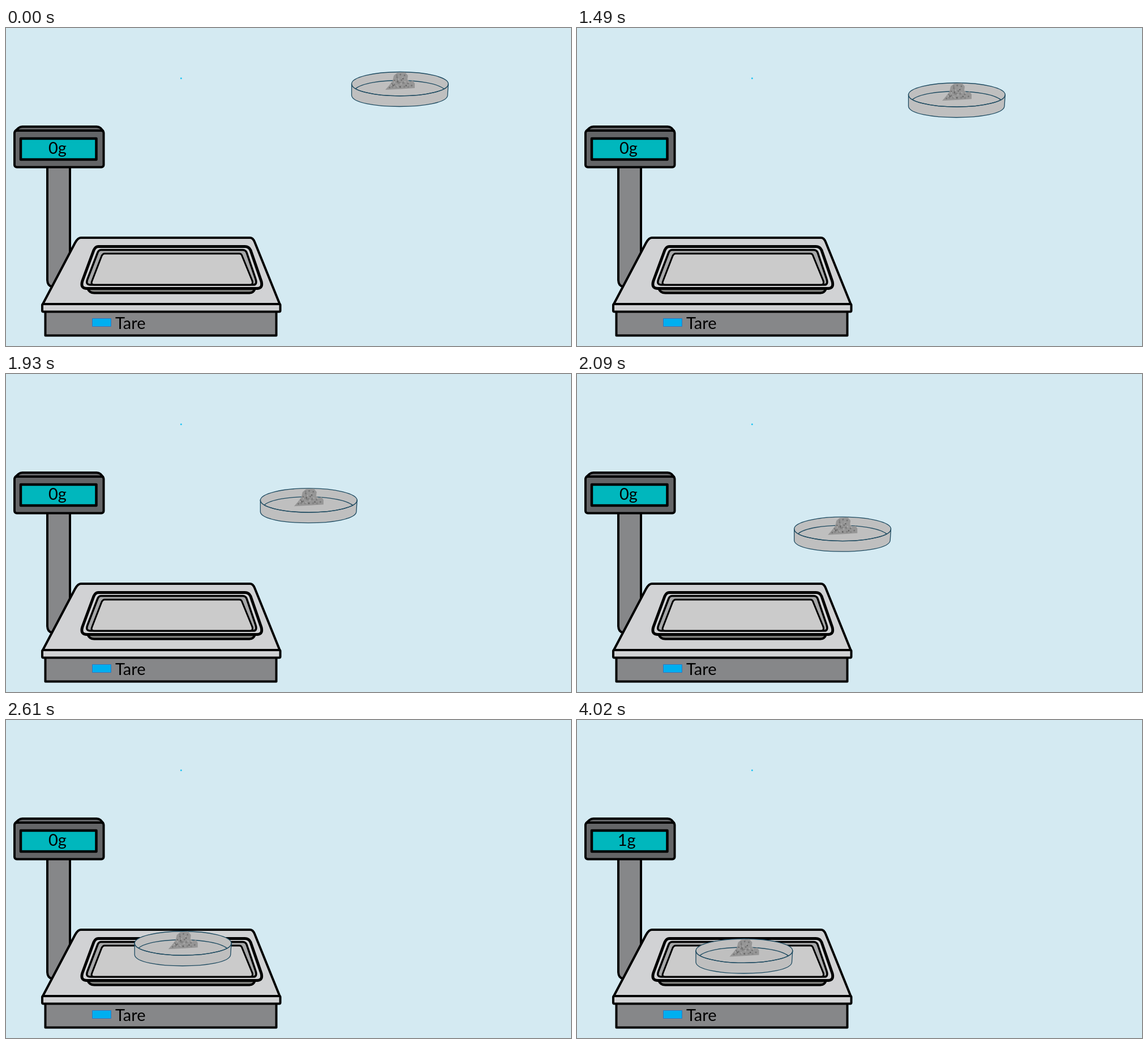
These frames come from a looping animation (998x561 px, 5.03 s). An HTML page without scripts:

```html
<!DOCTYPE html>
<html lang="en">
<head>
<meta charset="utf-8">
<title>Weighing a sample</title>
<style>
  @property --u { syntax: "<number>"; inherits: false; initial-value: 0; }

  html, body { margin: 0; width: 100%; height: 100%; overflow: hidden; background: #d4eaf2; }
  svg { display: block; width: 100%; height: 100%; }
  text { font: 29px Lato, "Open Sans", sans-serif; fill: #000; }

  .scale { stroke: #000; stroke-width: 4; stroke-linejoin: round; }
  .scale text { stroke: none; }
  .steel { fill: #868789; }
  .plate { fill: #d1d2d4; }
  .head { fill: #646567; }

  /* --u runs in 40 ms steps; --p is its smootherstep */
  .dish {
    --c: min(1, var(--u));
    --p: calc(var(--c) * var(--c) * var(--c) * (10 - 15 * var(--c) + 6 * var(--c) * var(--c)));
    transform: translate(calc(var(--p) * -400.5px), calc(var(--p) * 308.5px));
    animation: slide 5.03s infinite;
  }
  @keyframes slide {
    0% { --u: 0; animation-timing-function: step-end; }
    22.46% { --u: .008; animation-timing-function: steps(46, end); }
    59.04%, 100% { --u: 1.019; }
  }

  .glass { fill: #bfbfbf; stroke: #1d4a60; stroke-width: 1.3; }
  .line { fill: none; }

  .before, .after { animation: hide 5.03s step-end infinite; }
  .after { animation-name: show; }
  @keyframes hide { 0% { visibility: visible; } 79.91%, 100% { visibility: hidden; } }
  @keyframes show { 0% { visibility: hidden; } 79.91%, 100% { visibility: visible; } }
</style>
</head>
<body>
<svg viewBox="0 0 998 561" preserveAspectRatio="none">
  <rect width="998" height="561" fill="#d4eaf2"/>
  <circle cx="309.3" cy="88.7" r="1.5" fill="#1fc3f3"/>

  <g class="scale">
    <!-- column -->
    <path class="steel" d="M73 245V445Q73.500 455 81 456H113V245Z"/>

    <!-- display -->
    <path class="head" d="M16.500 181.500L22 176.500Q25 174 29 174H160Q164 174 167 176.500L171.500 181.500Z"/>
    <rect class="head" x="15" y="181" width="157.500" height="64.500" rx="4"/>
    <rect x="26" y="195" width="133.500" height="37" fill="#00b7bd" stroke-width="4.500"/>
    <text class="before" x="75" y="222">0g</text>
    <text class="after" x="71.800" y="222">1g</text>

    <!-- base and platform -->
    <rect class="steel" x="69.500" y="500" width="408" height="42.500"/>
    <path class="plate" d="M65 487L122 379Q127 370 132 370H431Q436 370 439 377L483.500 487Z"/>
    <rect class="plate" x="64" y="487" width="420.500" height="13.500" rx="2"/>

    <!-- tray -->
    <path d="M144 459Q147 467.500 156 467.500H430Q438 467 440 459Z" fill="#7c7d7a"/>
    <path class="plate" stroke-width="5" d="M163 385.500H422Q429 385.500 432 392L451 447Q454 459 444 459.500H142Q131 459 135 446L155 392Q158 385.500 163 385.500Z"/>
    <path fill="#a6a7a8" stroke-width="3.500" d="M168 391.500H418Q423 391.500 425 396L441 443Q444 453 437 453H149Q140 453 144 443L162 396Q164 391.500 168 391.500Z"/>
    <path fill="#cbcbcb" stroke-width="3" d="M174 398H412Q416 398 417 402L435 446Q437 453 431 453H156Q149 453 152 446L169 402Q171 398 174 398Z"/>

    <!-- button -->
    <rect x="152.500" y="512.500" width="33" height="14" fill="#00aff0" stroke="#3474bd" stroke-width="1"/>
    <text x="193" y="531">Tare</text>
  </g>

  <g class="dish">
    <g class="glass">
      <path d="M610.500 98.500V119C613 145 777 145 780 119L781.300 98.500Z"/>
      <ellipse cx="695.900" cy="98.700" rx="85.400" ry="21.200"/>
      <path class="line" d="M617.500 107C640 87.500 750 87.500 774.500 108"/>
    </g>
    <path fill="#969696" d="M670 109L677 101L683 93L685 84L691 79L705 78L710 84L709 91L713 94L719 93L722 98V106L699 107.500Z"/>
    <g fill="none" stroke-width="2.600">
      <path stroke="#747474" stroke-dasharray="2.500 5" d="M677 106L689 88L697 82L706 84M685 101L700 91L704 104M709 97L719 103"/>
      <path stroke="#828282" stroke-dasharray="3 4" d="M681 104H716M687 95L708 98M690 82L694 99"/>
      <path stroke="#aaa" stroke-dasharray="2 6" d="M680 101L692 91L701 87M690 103L708 93L716 99"/>
      <path stroke="#606060" stroke-dasharray="2 9" d="M683 102L696 90L705 89M695 104L715 100"/>
    </g>
    <!-- near rim over the pile's foot -->
    <path class="glass line" d="M610.500 98.700A85.400 21.200 0 0 0 781.300 98.700"/>
  </g>
</svg>
</body>
</html>
```
